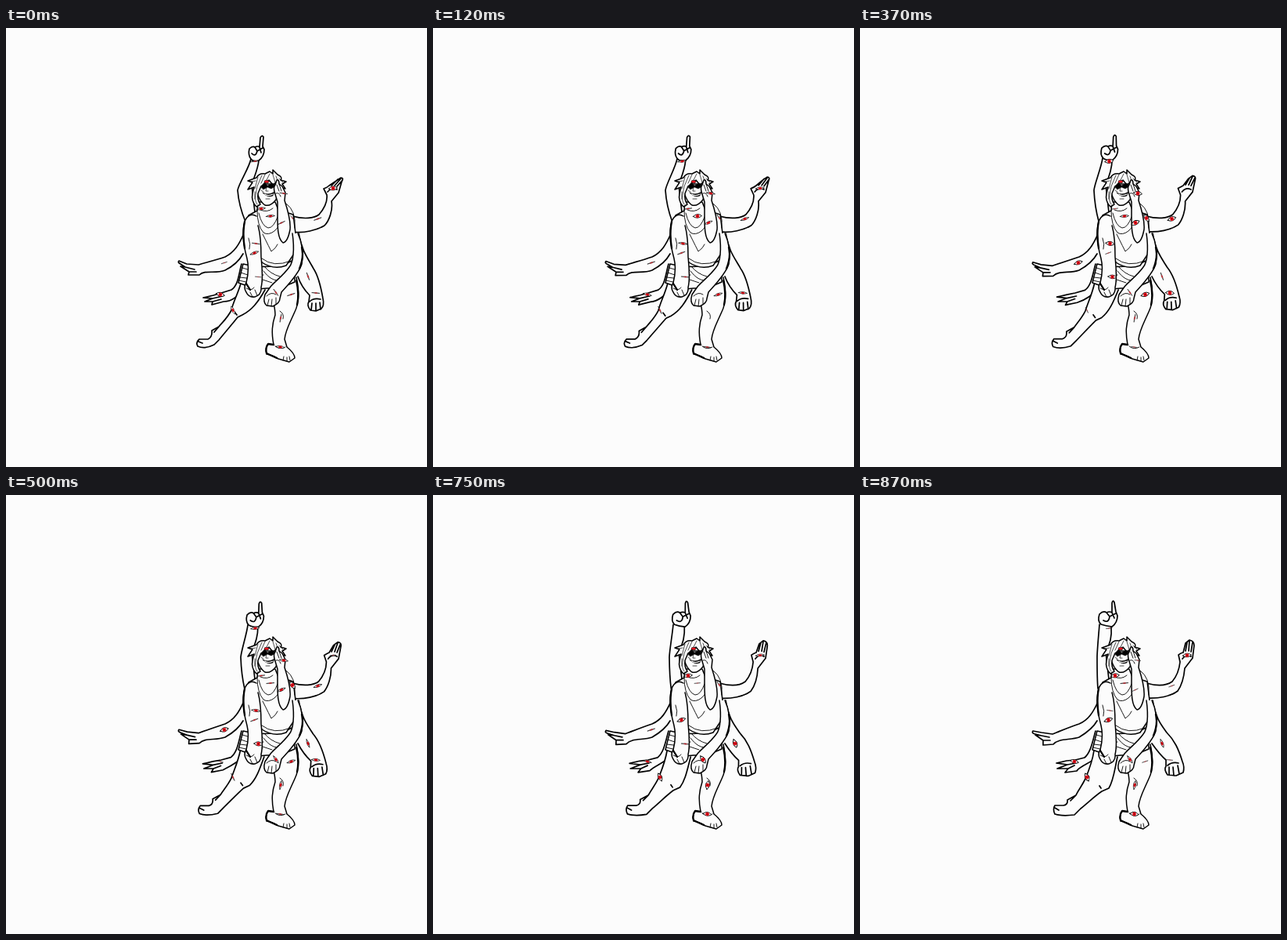
Recreate the animation shown at these times as an HTML page without scripts. Size 538x560 px, loop 1000 ms.

```html
<!DOCTYPE html>
<html lang="en">
<head>
<meta charset="utf-8">
<title>Many arms, many eyes</title>
<style>
html, body { margin: 0; width: 100%; height: 100%; overflow: hidden; background: #fcfcfc; }
svg { display: block; width: 100vw; height: 100vh; }
path { fill: #fcfcfc; stroke: #000; stroke-width: 1.5; stroke-linejoin: round; stroke-linecap: round; }
.line { fill: none; stroke-width: .9; }
.fine { fill: none; stroke-width: .7; }
.bold { fill: none; stroke-width: 2.3; }
.ink { fill: #000; stroke-width: .5; }

/* Eight held poses per second */
.limb { stroke-width: 1.7; animation: 1s steps(8, jump-none) -5ms infinite; }
.raised { animation-name: raised; }
.fist { animation-name: fist; }
.wave { animation-name: wave; }
.reach { animation-name: reach; }
.low { animation-name: low; }
.hang { animation-name: hang; }
.leg { animation-name: leg; }
@keyframes raised { to { d: path("M306 165C305 178 303 199 303 207C303 220 303 235 304 247L318 235L314 200C320 190 322 180 321 168"); } }
@keyframes fist { to { d: path("M322 150L322 138Q323 133 325 137L327 149L329 154Q329 163 322 168Q314 167 308 165Q303 161 306 152Q311 147 315 150Q319 148 322 150M311 160Q318 164 319 155L315 150M319 155L327 151M322 150L325 157"); } }
@keyframes wave { to { d: path("M366 240C380 244 392 243 399 238C405 231 408 222 409 213L407 204Q411 201 413 201L416 189L421 185Q427 186 427 192L425 208L415 221C414 232 411 243 406 250C397 257 381 260 366 259M416 199L418 188M420 199L421 186M423 200L425 188M412 209Q417 202 423 206"); } }
@keyframes reach { to { d: path("M304 264C298 277 292 287 280 292C268 296 256 301 246 305L232 303L221 301Q219 304 224 305L232 307L224 306L234 313L234 319L247 318C254 310 268 313 280 309C290 303 298 297 303 288M232 307L242 309M234 313L243 313"); } }
@keyframes low { to { d: path("M301 301C297 315 295 328 287 335L275 338L264 339L251 342L265 344L252 349L266 349L262 354L277 352C280 346 297 341 306 332M265 344L276 342M266 349L274 345"); } }
@keyframes hang { to { d: path("M374 262C378 285 384 292 392 303C402 313 407 324 412 340Q415 347 413 354L404 358L393 357Q388 350 391 346L391 338C384 332 378 324 373 317M395 347L395 357M400 347L401 358M406 345L408 356M393 345Q399 340 407 342"); } }
@keyframes leg { to { d: path("M299 326C297 340 293 350 288 362C283 372 278 378 276 383L265 389Q266 395 260 396L249 396Q246 401 249 407Q258 410 274 408L282 400C292 392 300 384 309 378L318 374C324 364 325 352 329 334M249 399L254 402M276 383L269 390M306 371L308 374"); } }

/* --p is the pose in which an eye is widest */
.eye { animation: blink 1s step-end calc((var(--p) - 8) * 125ms - 5ms) infinite; }
@keyframes blink {
  0% { scale: 1 1; }
  12.5% { scale: 1 .6; }
  25% { scale: .9 .25; }
  37.5% { scale: 0 0; }
  50% { scale: .7 .12; }
  62.5% { scale: .9 .22; }
  75% { scale: 1 .55; }
  87.5% { scale: 1 .9; }
}
</style>
</head>
<body>
<svg viewBox="0 0 538 560">
  <defs>
    <g id="eye">
      <path d="M-5.5 0Q0-5.5 5.5 0Q0 5 -5.5 0Z" style="stroke-width:.9"/>
      <circle r="2.4" fill="#f0101c"/>
      <circle r=".7" fill="#300"/>
    </g>
  </defs>

  <!-- Arms behind the body -->
  <path class="limb raised" d="M313 167C311 178 297 199 296 207C297 220 301 235 306 247L318 235L314 200C317 190 322 180 323 169"/>
  <path class="limb fist" d="M324 152L325 140Q327 136 329 139L328 151L330 155Q330 164 323 169Q315 171 313 167Q309 162 311 154Q315 150 318 152Q322 150 324 152M314 160Q319 165 321 157L318 152M321 157L328 153M324 152L326 159"/>
  <path class="limb wave" d="M366 240C380 244 394 243 400 238C406 231 411 222 410 213L406 205Q411 203 413 201L422 195L428 191Q432 191 429 196L425 210L416 221C418 232 413 246 407 252C397 258 381 262 366 260M416 201L424 193M420 201L428 192M423 202L430 194M411 209Q416 203 423 206"/>
  <path class="limb reach" d="M304 262C298 276 292 286 280 292C268 296 256 299 246 302L231 301L221 297Q219 299 223 301L229 305L223 304L234 311L233 315L247 315C254 308 268 314 280 309C290 304 298 297 303 288M229 305L241 308M234 311L243 311"/>
  <path class="limb low" d="M301 301C297 315 297 328 288 334L275 338L265 341L252 344L264 345L254 349L264 349L263 353L278 349C290 349 297 341 306 330M264 345L277 342M264 349L275 346"/>
  <path class="limb hang" d="M374 262C378 285 386 294 393 307C399 316 402 328 405 345Q407 354 403 358L396 361L389 360Q384 354 387 349L388 341C381 334 376 326 373 317M391 351L390 360M396 351L396 361M401 350L402 359M388 349Q393 344 402 346"/>

  <!-- Legs and shorts -->
  <path d="M371 318C376 340 374 352 369 362C362 378 357 386 356 397L359 407Q369 415 369 421L362 426L348 422Q340 417 333 416Q331 408 335 403L342 404C339 388 340 378 344 366C344 356 341 350 340 335"/>
  <path class="bold" d="M342 404L335 403Q331 408 333 415L346 421M371 322Q375 340 372 353"/>
  <path class="line" d="M354 424L355 419M359 425L359 420M363 424L362 419M344 406Q350 411 357 407M350 361Q356 365 354 371"/>
  <path class="limb leg" d="M300 326C296 340 290 350 288 360C283 370 276 376 272 381L263 386Q264 394 258 397L247 397Q242 401 245 406Q254 410 266 404L272 398C281 387 288 379 296 369L302 366C314 360 322 350 331 334M246 400L251 402M272 381L266 388M292 362L295 366"/>
  <path d="M303 301L297 325Q310 330 322 333L333 332Q350 333 369 324L368 296Q340 310 303 301Z"/>
  <path class="line" d="M302 306Q317 311 328 309M300 312Q314 318 329 315M299 318Q314 319 328 323M298 322Q311 324 324 330M330 304Q338 314 350 317M329 310Q338 322 347 322M328 321L340 325"/>

  <!-- Torso -->
  <path d="M322 222L321 233L310 239L316 270L327 299Q342 309 358 303L368 288L370 262L367 238L348 232L344 222Z"/>
  <path class="line" d="M321 233Q321 252 329 261Q335 265 343 259Q352 251 353 240M323 236Q327 253 335 255Q342 255 347 241M328 263Q337 281 339 285Q345 281 347 276M327 294Q342 306 364 297M325 232Q334 236 341 230"/>

  <!-- Front arms -->
  <path d="M366 262C369 283 367 299 362 305C354 316 344 323 338 330L331 340Q328 350 333 354L341 355Q350 351 350 345L352 337C360 328 374 314 378 301C380 288 379 275 373 262" stroke-width="1.7"/>
  <path class="line" d="M336 346L334 354M340 346L339 355M345 344L345 352M333 342Q339 336 345 340"/>
  <path d="M320 240C314 236 308 239 305 247C302 258 303 276 308 294C311 306 309 317 307 325Q303 331 307 337Q310 344 318 343Q327 340 326 331C329 319 327 303 326 292C326 278 325 262 322 252" stroke-width="1.7"/>
  <path class="line" d="M307 332Q314 336 317 331M312 337L315 343M318 334L321 341M310 268Q313 276 311 282"/>
  <path class="bold" d="M305 247Q302 262 305 281M378 280Q381 292 375 307M307 326L312 334"/>

  <!-- Head -->
  <path d="M319 199Q321 219 331 226Q338 228 345 219L351 199Z" stroke-width="1.2"/>
  <path d="M320 228Q313 221 315 211L317 203L309 206L315 197L309 195L320 191Q323 185 331 186L337 183L341 186L341 181L347 187Q354 190 351 194L358 196L353 199L357 205L348 203L345 197L341 200L336 194L330 198L325 204L322 211Q321 219 325 225Z" stroke-width="1"/>
  <path class="fine" d="M322 190L318 205M327 188L321 202L318 218M331 187L326 198M337 186L333 194M341 187L344 197M345 189L349 200M318 209Q317 219 321 225M313 196L319 195M349 192L354 197"/>
  <path class="ink" d="M325 202L331 198L334 201L341 198L344 202L339 205L334 203L329 206ZM328 210Q335 214 343 209L341 214Q334 217 328 210Z"/>
  <path class="fine" d="M333 202L332 208L335 208M332 218L337 218M326 207L329 209"/>
  <path d="M330.500 212Q335 215 341 212" style="stroke:#fcfcfc;stroke-width:1.100;fill:none"/>
  <ellipse cx="333" cy="196" rx="3" ry="1.800" fill="#e8141e" stroke="#000" stroke-width=".6"/>

  <!-- Arm held to the face -->
  <path d="M347 222L344 212Q341 204 344 200L346 194Q349 193 349 199L353 202L357 210L356 220C360 232 364 246 363 257Q360 273 354 274C347 269 347 253 347 241Z" stroke-width="1.300"/>
  <path class="line" d="M346 200L349 208M349 199L352 208M345 211Q349 209 351 215"/>
  <path class="line" d="M358 224Q371 233 369 255"/>

  <!-- Eyes -->
  <use href="#eye" class="eye" style="--p:3;translate:318.500px 170px;rotate:-8deg"/>
  <use href="#eye" class="eye" style="--p:0;translate:418px 204.500px;rotate:-5deg"/>
  <use href="#eye" class="eye" style="--p:3;translate:398.500px 243.500px;rotate:-20deg"/>
  <use href="#eye" class="eye" style="--p:3;translate:355px 211px;rotate:8deg"/>
  <use href="#eye" class="eye" style="--p:7;translate:326px 230.500px;rotate:-8deg"/>
  <use href="#eye" class="eye" style="--p:2;translate:338px 240px;rotate:-5deg"/>
  <use href="#eye" class="eye" style="--p:3;translate:352px 248.500px;rotate:-25deg"/>
  <use href="#eye" class="eye" style="--p:4;translate:366px 242.500px;rotate:55deg"/>
  <use href="#eye" class="eye" style="--p:3;translate:319.500px 275px;rotate:8deg"/>
  <use href="#eye" class="eye" style="--p:7;translate:317.500px 287px;rotate:-20deg"/>
  <use href="#eye" class="eye" style="--p:4;translate:279px 299.500px;rotate:-18deg"/>
  <use href="#eye" class="eye" style="--p:4;translate:322.500px 317.500px;rotate:5deg"/>
  <use href="#eye" class="eye" style="--p:0;translate:274px 340px;rotate:15deg"/>
  <use href="#eye" class="eye" style="--p:6;translate:386px 317px;rotate:70deg"/>
  <use href="#eye" class="eye" style="--p:3;translate:396px 338px;rotate:5deg"/>
  <use href="#eye" class="eye" style="--p:6;translate:345px 337.500px;rotate:55deg"/>
  <use href="#eye" class="eye" style="--p:3;translate:364.500px 340px;rotate:-18deg"/>
  <use href="#eye" class="eye" style="--p:6;translate:351px 370px;rotate:-80deg"/>
  <use href="#eye" class="eye" style="--p:7;translate:350.500px 407px;rotate:8deg"/>
  <use href="#eye" class="eye" style="--p:7;translate:290px 360px;rotate:65deg"/>
</svg>
</body>
</html>
```
